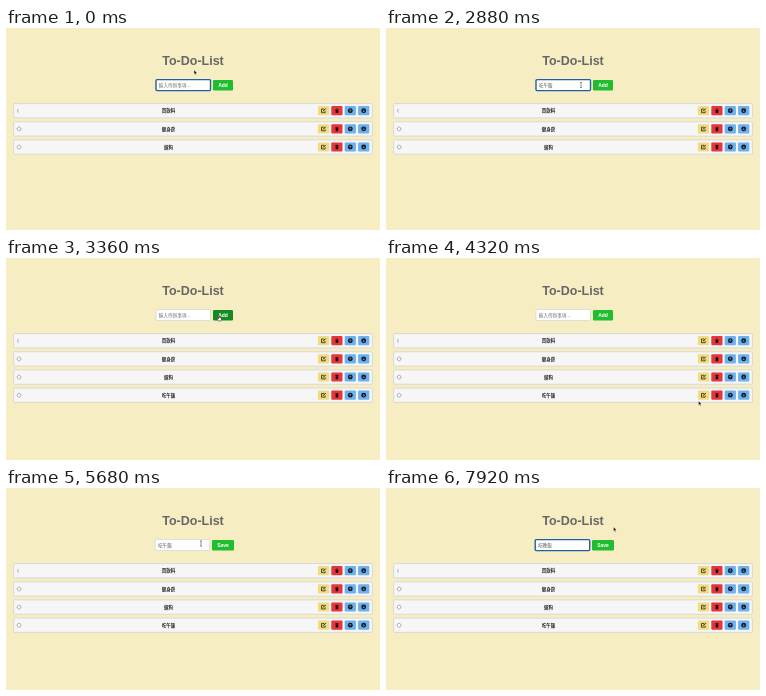
An HTML page that plays this animation: 374x202 px, repeating every 8000 ms.

```html
<!DOCTYPE html>
<html lang="zh-Hant">
<head>
<meta charset="utf-8">
<title>To-Do-List</title>
<style>
html, body { margin: 0; width: 100%; height: 100%; overflow: hidden; background: #f6eec2; }
svg { display: block; width: 374px; height: 202px; }
text { font-family: "Liberation Sans", Arial, "Noto Sans CJK TC", "Noto Sans CJK JP", sans-serif; }
.mid { text-anchor: middle; font-weight: bold; }
</style>
</head>
<body>
<svg viewBox="0 0 374 202">
  <defs>
    <g id="edit" fill="none" stroke="#111" stroke-width=".7">
      <path d="M.6-1.7H-2V2H1.7V.4"/><path d="M-.5.6 2.2-2.1" stroke-width="1"/>
    </g>
    <path id="trash" d="M-1.7-1.7H-.7L-.4-2.2H.4L.7-1.7H1.7V-1.1H-1.7ZM-1.4-.8H1.4L1.2 2.3H-1.2Z" fill="#111"/>
    <g id="up">
      <circle r="2.4" fill="#111"/>
      <path d="M0 1.3V-1.2M-1.1 0 0-1.2 1.1 0" fill="none" stroke="#6cb0ee" stroke-width=".6"/>
    </g>
    <use id="down" href="#up" transform="scale(1 -1)"/>
  </defs>
  <text class="mid" x="187" y="37.3" font-size="12.5" fill="#666">To-Do-List</text>
  <rect id="field" y="51.6" width="54.5" height="11" rx="1" fill="#fff"/>
  <text id="value" y="58.8" font-size="4.6"></text>
  <path id="underline" stroke="#777" stroke-width=".4"/>
  <rect id="button" y="52" height="10.4" rx="1.2"/>
  <text id="caption" class="mid" x="217" y="58.9" font-size="5" fill="#fff"></text>
  <g id="list"></g>
  <g id="pointer" stroke-linejoin="round">
    <path id="arrow" d="M0 0V4.3L1 3.4 1.7 5 2.5 4.6 1.8 3.1H3.1Z" fill="#111" stroke="#fff" stroke-width=".35"/>
    <path id="beam" d="M-.9-2.6H.9M-.9 2.6H.9M0-2.6V2.6" fill="none" stroke="#444" stroke-width=".6"/>
    <path id="hand" d="M-.5-.3Q0-.8.5-.3V1.6L2.4 2.1V3.5L1.8 5H-.7L-2 2.8-1.5 2.3-.5 3Z" fill="#fff" stroke="#111" stroke-width=".5"/>
  </g>
</svg>
<script>
const $ = id => document.getElementById(id);
const set = (id, attrs) => Object.entries(attrs).forEach(([k, v]) => $(id).setAttribute(k, v));
const LOOP = 8000, STEP = 80, EM = 4.6;

const tools = [["edit", "#f1dc80"], ["trash", "#e6363c"], ["up", "#6cb0ee"], ["down", "#6cb0ee"]];
const row = (label, i) => `<g transform="translate(0 ${75.6 + i * 18.15})">
  <rect x="7.6" width="358.8" height="14.3" rx=".8" fill="#f6f6f6" stroke="#d6d6d2" stroke-width=".9"/>
  <path d="${i ? "M15 7.2a1.9 1.9 0 1 1 0-.01" : "M12.3 5.4q-1.4 1.8 0 3.6"}" fill="#fff" stroke="#777" stroke-width=".6"/>
  <text class="mid" x="162.4" y="8.9" font-size="4.5" fill="#222">${label}</text>
  ${tools.map(([icon, fill], k) => `<g transform="translate(${317.5 + k * 13.4} 7.1)">
    <rect x="-5.6" y="-4.6" width="11.2" height="9.2" rx="1" fill="${fill}"/><use href="#${icon}"/></g>`).join("")}
</g>`;
$("list").innerHTML = ["買飲料", "健身房", "遛狗", "吃午飯"].map(row).join("");

// [time, text, first composing character]
const typing = [
  [0, ""], [880, "ㄔ", 0], [1040, "ㄔˉ", 0], [1200, "吃", 0],
  [1760, "吃ㄨ", 0], [1840, "吃ㄨˇ", 0], [1920, "吃午", 0],
  [2160, "吃午ㄈ", 0], [2240, "吃午ㄈㄢ", 0], [2400, "吃午飯", 0], [2480, "吃午飯"],
  [3360, ""], [4720, "吃午飯"], [6240, "吃午"], [6400, "吃"],
  [6560, "吃ㄨ", 1], [6720, "吃ㄨㄢ", 1], [6960, "吃晚", 1], [7040, "吃晚ㄈ", 1],
  [7280, "吃晚ㄈㄢ", 1], [7360, "吃晚ㄈㄢˋ", 1], [7520, "吃晚飯", 1], [7760, "吃晚飯"]
];

// [time, x, y, shape]; no shape hides the pointer
const moves = [
  [0, 188, 42, "arrow"], [80, 188.5, 45, "arrow"], [160, 189.5, 54, "beam"], [240, 190, 56.5, "beam"],
  [560, 190, 56.5], [2880, 195, 57, "beam"], [2960, 206, 58, "arrow"], [3040, 213, 58, "hand"],
  [3600, 213, 58, "hand"], [3680, 216, 65, "arrow"], [4000, 300, 174, "arrow"], [4160, 311, 158, "arrow"],
  [4320, 312.5, 143, "arrow"], [4400, 315, 139, "hand"], [4720, 316, 139, "hand"], [4800, 302, 128, "arrow"],
  [5040, 206, 77, "arrow"], [5440, 205, 74, "arrow"], [5600, 197, 57, "beam"], [5680, 195, 55.5, "beam"],
  [5760, 195, 55.5, "beam"], [5920, 200, 38, "arrow"], [6240, 200, 38], [7680, 200, 38],
  [7760, 206, 39, "arrow"], [7920, 227.5, 39, "arrow"]
];

const indexAt = (keys, t) => keys.findLastIndex(key => key[0] <= t);

function drawField(t) {
  const [, text, from] = typing[indexAt(typing, t)];
  const editing = t >= 4720, focused = t < 3200 || t >= 5760;
  const left = editing ? 149.2 : 150, textX = left + 2.8;
  set("field", { x: left, stroke: focused ? "#215f9f" : "#d6d6d2", "stroke-width": focused ? 1.4 : 0.8 });
  set("value", { x: textX, fill: text ? "#555" : "#777" });
  $("value").textContent = text || "輸入待辦事項...";
  set("underline", { d: from === undefined ? "" : `M${textX + from * EM} 59.7H${textX + text.length * EM}` });
  const hover = t >= 3040 && t < 3680;
  set("button", { x: editing ? 206 : 207, width: editing ? 22 : 20, fill: hover ? "#168a22" : "#20bd2e" });
  $("caption").textContent = editing ? "Save" : "Add";
  $("list").lastElementChild.style.display = t >= 3360 ? "" : "none";
}

function drawPointer(t) {
  const i = indexAt(moves, t), [t0, x0, y0, shape] = moves[i];
  const [t1, x1, y1] = moves[i + 1] || [LOOP, x0, y0];
  const p = (t - t0) / (t1 - t0);
  set("pointer", { transform: `translate(${x0 + (x1 - x0) * p} ${y0 + (y1 - y0) * p})` });
  for (const id of ["arrow", "beam", "hand"]) $(id).style.display = id === shape ? "" : "none";
}

function frame() {
  const t = Math.floor(performance.now() % LOOP / STEP) * STEP;
  drawField(t);
  drawPointer(t);
  requestAnimationFrame(frame);
}
frame();
</script>
</body>
</html>
```
